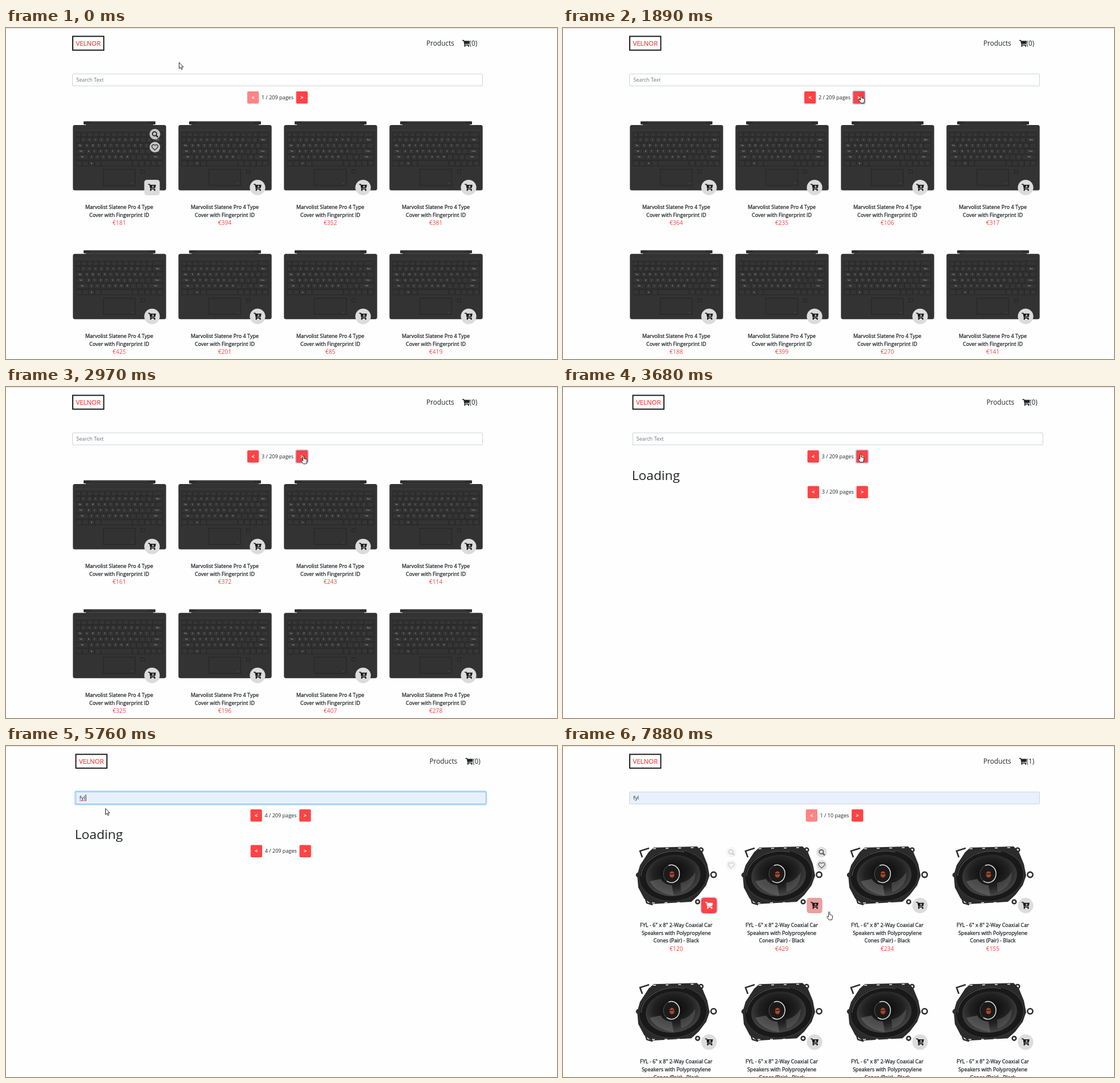
These frames come from a looping animation (966 by 580 pixels, 8000 ms). An HTML page:

```html
<!DOCTYPE html>
<html lang="en">
<head>
<meta charset="utf-8">
<title>Shop demo</title>
<style>
  html, body { margin: 0; width: 100%; height: 100%; overflow: hidden; background: #fefefe; }
  svg { display: block; width: 966px; height: 580px; font: 9.05px "Open Sans", sans-serif; fill: #212529; }
  text { white-space: pre; }
  .mid { text-anchor: middle; }
  .name { stroke: #212529; stroke-width: .28px; }
  .logo { font-size: 11.4px; fill: #ff4345; stroke: #ff4345; stroke-width: .25px; }
  .nav { font-size: 11.8px; }
  .price { font-size: 10.15px; fill: #ff4345; }
  .sign { fill: #fff; stroke: #fff; stroke-width: .35px; }
  .crisp { shape-rendering: crispEdges; }
  .key { font-size: 2.9px; fill: #bbb; text-anchor: middle; }
</style>
</head>
<body>
<svg viewBox="0 0 966 580">
  <defs>
    <radialGradient id="cone" cx=".5" cy=".42" r=".6">
      <stop offset=".15" stop-color="#0c0c0c"/>
      <stop offset=".6" stop-color="#222"/>
      <stop offset="1" stop-color="#4a4a4a"/>
    </radialGradient>
    <filter id="soft" x="-10%" y="-10%" width="120%" height="120%">
      <feDropShadow dx="0" dy="1" stdDeviation="1.6" flood-opacity=".3"/>
    </filter>
    <g id="keyboard"></g>
    <g id="speaker">
      <g fill="none" stroke="#2e2e2e" stroke-width="2.600">
        <circle cx="264" cy="225.500" r="4.600"/>
        <circle cx="242" cy="182" r="3.300"/>
        <circle cx="236" cy="273" r="3.300"/>
        <circle cx="132" cy="226" r="3"/>
        <path d="M139 195l-4-11 16-5M143 262l4 13 10 3"/>
      </g>
      <path d="M130 226l5-17 15-23 9-8 76-2 9 9 9 22 4 20-6 17-13 17-13 12-70 4-13-10-10-19z" fill="#2b2b2b"/>
      <path d="M158 180l74-2M156 275l66-1" stroke="#eee" stroke-width="1.500" stroke-dasharray="5 17"/>
      <g transform="rotate(-6 193 227)">
        <ellipse cx="193" cy="227" rx="59.500" ry="45" fill="#191919" stroke="#3c3c3c"/>
        <ellipse cx="193" cy="227" rx="48" ry="36" fill="url(#cone)"/>
        <path d="M137 222a57 43 0 0 1 80-34" fill="none" stroke="#4a4a4a" stroke-width="1.500"/>
      </g>
      <path d="M152 237q10 20 42 25l-3-18q-14-1-20-11z" fill="#777" opacity=".5"/>
      <path d="M206 240q16-3 26-19 0 26-25 35z" fill="#6a6a6a" opacity=".45"/>
      <ellipse cx="190" cy="224" rx="14" ry="15.500" fill="#1b1b1b" stroke="#555"/>
      <path d="M185 209.500a14 15.500 0 1 1-3 27" fill="none" stroke="#ddd" stroke-width="1.500"/>
      <ellipse cx="191" cy="225" rx="4.500" ry="5.500" fill="#a5472f"/>
      <path d="M179 225l24-2" stroke="#2a1713" stroke-width="1.300"/>
    </g>
    <g id="cart">
      <path d="M0 0h4.200l.5 2H18l-1.700 7.700H6.600l.3 1.300H16l-.4 2H5.200L2.900 2H0z"/>
      <circle cx="6" cy="14.300" r="1.750"/><circle cx="15" cy="14.300" r="1.750"/>
    </g>
    <path id="arrow" d="M.5.5v10.600l2.400-2.200 1.700 3.800 1.700-.8-1.600-3.600h3.200z" fill="#fff" stroke="#111" stroke-width=".9"/>
    <path id="hand" d="M3.500 9.300V1.800q0-1.300 1.100-1.300t1.100 1.300v3.800l3.700.9q1.300.3 1.300 1.800l-.5 3.200-.8 3.200H4.300L1 10.300Q.1 9 1.200 8.600q1.100-.2 2.300.9z" fill="#fff" stroke="#111" stroke-width=".9"/>
    <path id="beam" d="M-2.500-5.500h2l.5.5.5-.5h2M0-5V5M-2.500 5.500h2L0 5l.5.5h2" fill="none" stroke="#222"/>
  </defs>
  <path d="M0 .5h966" stroke="#dcdcdc"/>
  <g id="view"></g>
</svg>
<script>
const LOOP = 8000, RED = '#ff4345', QUERY = 'fyl';

// The screen refreshes only at these moments.
const ticks = [0, 120, 240, 390, 510, 630, 780, 1040, 1890, 2040, 2160, 2690, 2970, 3680,
  3830, 3950, 4080, 4200, 4350, 4500, 4650, 4800, 5090, 5210, 5330, 5480, 5760, 5910, 6030,
  6150, 6270, 6390, 6510, 6630, 6750, 6870, 6990, 7110, 7240, 7360, 7480, 7600, 7730, 7880];

const scenes = [
  [0, 'grid', 1], [1040, 'load', 1], [1890, 'grid', 2], [2690, 'load', 2], [2970, 'grid', 3],
  [3680, 'load', 3], [3830, 'grid', 4], [5760, 'load', 4], [6150, 'found', 1]
];

const pointer = [
  [0, 303, 60, 'arrow'], [240, 348, 76, 'arrow'], [390, 440, 91, 'beam'], [510, 545, 116, 'arrow'],
  [630, 529, 118, 'hand'], [780, 518, 117, 'hand'], [1890, 518, 117, 'hand'], [2040, 517, 121, 'hand'],
  [2160, 517, 120, 'hand'], [2970, 517, 120, 'hand'], [3680, 517, 117, 'hand'], [3830, 517, 117, 'arrow'],
  [4200, 260, 97, 'beam'], [4350, 254, 97, 'beam'], [4650, 254, 97, 'beam'], [4800, 253, 97, 'beam'],
  [5090, 232, 112, 'arrow'], [5330, 204, 115, 'arrow'], [5480, 174, 109, 'arrow'],
  [5910, 174, 109, 'arrow'], [6630, 256, 270, 'hand'], [6750, 254, 279, 'hand'], [7480, 252, 280, 'hand'],
  [7600, 300, 284, 'arrow'], [7730, 474, 291, 'hand'], [7880, 462, 290, 'hand']
];

// Hover progress of the first two cards: tool icons, squared button, red button.
const hover = [
  { tools: [[0, .9], [120, .5], [240, .15], [390, 0], [6270, 0], [6750, 1], [7600, 1], [7730, .8], [7880, .22]],
    square: [[0, 1], [240, .3], [390, 0], [6270, 0], [6630, 1]],
    red: [[6630, 0], [6990, 1]] },
  { tools: [[7600, 0], [7730, .1], [7880, .75]],
    square: [[7600, 0], [7730, .6], [7880, 1]],
    red: [[7600, 0], [7730, .5], [7880, .4]] }
];

const prices = {
  1: [181, 394, 352, 381, 425, 201, 85, 419],
  4: [378, 318, 360, 309, 348, 342, 363, 180],
  found: [120, 429, 234, 155]
};
const priceOf = (page, i) => (prices[page] || [])[i] || 90 + (page * 137 + i * 211) % 340;

const names = {
  grid: ['Marvolist Slatene Pro 4 Type', 'Cover with Fingerprint ID'],
  found: ['FYL - 6" x 8" 2-Way Coaxial Car', 'Speakers with Polypropylene', 'Cones (Pair) - Black']
};

const lerp = (a, b, p) => a + (b - a) * p;
const at = (rows, t) => rows.findLast(r => r[0] <= t) || rows[0];

function mix(rows, t, col = 1) {
  const a = at(rows, t), b = rows[rows.indexOf(a) + 1];
  if (!b || t <= a[0]) return a[col];
  return lerp(a[col], b[col], (t - a[0]) / (b[0] - a[0]));
}

const blend = p => `rgb(${[[220, 255], [220, 67], [220, 69]].map(([a, b]) => Math.round(lerp(a, b, p)))})`;
const rect = (x, y, w, h, fill, more = '') => `<rect x="${x}" y="${y}" width="${w}" height="${h}" fill="${fill}" ${more}/>`;
const text = (x, y, s, cls = '', more = '') => `<text x="${x}" y="${y}" class="${cls}" ${more}>${s}</text>`;
const use = (id, x, y, scale = 1, more = '') =>
  `<use href="#${id}" transform="translate(${x} ${y}) scale(${scale})" ${more}/>`;

function keyboard() {
  let out = rect(136, 163.6, 126, 5.4, '#2c2c2c', 'rx="1"') + rect(148, 165.2, 102, .9, '#484848') +
    rect(140, 168.6, 118, 1.6, '#3a3a3a') +
    rect(117.3, 170, 163.4, 114.4, '#333', 'rx="3.500"') + rect(117.3, 178, 163.4, .8, '#3f3f3f') +
    rect(122.5, 182.5, 153, 60, '#2d2d2d', 'rx="1"');
  const cap = (x, y, w, h, s) => rect(x, y, w - .9, h, '#343434', 'rx=".8" stroke="#242424" stroke-width=".5"') +
    text(x + w / 2 - .4, y + h / 2 + 1, s, 'key');
  const rows = [
    [183.5, 6.5, 9, '------------', ''], [192, 8.6, 8, '1234567890-=', 'Back'],
    [202, 8.6, 14, 'QWERTYUIOP[]', ''], [212, 8.6, 17, "ASDFGHJKL;'", 'Enter'],
    [222, 8.8, 22, 'ZXCVBNM,./', 'Shift']
  ];
  for (const [y, h, first, keys, last] of rows) {
    let x = 123 + first;
    out += cap(123, y, first, h, first > 10 ? 'Tab' : '-');
    for (const k of keys) { out += cap(x, y, 10.5, h, k); x += 10.5; }
    out += cap(x, y, 275.5 - x, h, last);
  }
  for (let i = 0; i < 4; i++) out += cap(123 + i * 11, 232.8, 11, 8.6, i === 2 ? '■' : '-');
  out += cap(167, 232.8, 55, 8.6, '');
  for (let i = 0; i < 5; i++) out += cap(222 + i * 10.7, 232.8, 10.7, 8.6, '▫-▫‹›'[i]);
  return out + rect(170.5, 247.5, 56, 28.5, '#323232', 'stroke="#1f1f1f" stroke-width=".7"') +
    rect(236.5, 248.5, 6, 6, 'none', 'stroke="#1c1c1c" stroke-width=".8" stroke-dasharray="4 1"') +
    text(222, 274, 'ID', 'key', 'opacity=".3"');
}

function header(count) {
  return rect(117, 14.6, 54.4, 24.2, 'none', 'stroke="#1c1c1f" stroke-width="2"') +
    text(144.2, 31, 'VELNOR', 'logo mid') + text(737, 31, 'Products', 'nav') +
    use('cart', 800, 21, .73) + text(812.6, 31, `(${count})`, 'nav');
}

function search(t) {
  const focus = t >= 4650 && t < 7480, filled = t >= 5210;
  let out = focus ? rect(115, 79, 722, 24, 'none', 'rx="3" stroke="#bfdeff" stroke-width="2"') : '';
  out += rect(116.5, 80.5, 719, 21, filled ? '#e8f0fe' : '#fff',
    `rx="2" class="crisp" stroke="${focus ? '#80bdff' : '#ced4da'}"`);
  out += filled ? text(123.2, 94, QUERY) : text(123.2, 94, 'Search Text', '', 'fill="#6c757d"');
  if (t >= 4500 && t < 7480) out += rect(t >= 5760 ? 134 : 123, 85, 1, 11.5, '#222');
  if (t >= 5760 && t < 7480) out += rect(123.5, 95.4, 10, .9, '#e33');
  return out;
}

function pager(page, total, ring) {
  const half = total > 99 ? 53 : 50.3;
  const button = (x, sign, off) => `<g opacity="${off ? .65 : 1}">` + rect(x, 111, 20.3, 21.5, RED, 'rx="2"') +
    text(x + 10.1, 124.8, sign, 'sign mid') + '</g>';
  const x = 476 + half - 20.3;
  return button(476 - half, '&lt;', page === 1) + text(476, 124.5, `${page} / ${total} pages`, 'mid') +
    (ring ? rect(x - .7, 110.3, 21.7, 22.9, 'none', 'rx="2.500" stroke="#a9cdfb" stroke-width="1.800"') : '') +
    button(x, '&gt;', false);
}

function tool(x, y, icon) {
  return `<g transform="translate(${x} ${y})" fill="none" stroke="#222"><circle r="9.300" fill="#d6d6d6" stroke="none"/>${icon}</g>`;
}

function card(kind, page, i, t) {
  const h = i < 2 ? hover[i] : null;
  const [tools, square, red] = h ? [mix(h.tools, t), mix(h.square, t), mix(h.red, t)] : [0, 0, 0];
  const added = i === 0 && t >= 7480;
  const x = 185 * (i % 4), y = (kind === 'found' ? 239.3 : 225.8) * (i > 3);
  const lines = names[kind], fill = blend(red), r = lerp(13.6, 5, square);
  let out = `<g transform="translate(${x} ${y})"><use href="#${kind === 'found' ? 'speaker' : 'keyboard'}"/>`;
  if (tools) {
    const tx = lerp(306, 256, tools);
    out += `<g opacity="${tools}">` +
      tool(tx, 186, '<circle cx="-.6" cy="-.6" r="3.600" stroke-width="1.800"/><path d="M2 2l3.400 3.400" stroke-width="2.400"/>') +
      tool(tx, 208.7, '<path d="M0 5.300L-4.700.6q-1.500-2.400.3-4.200 2.300-1.800 4.400.8 2.100-2.600 4.400-.8 1.800 1.800.3 4.200z" stroke-width="1.200"/>') + '</g>';
  }
  if (added) out += rect(240.8, 264.3, 30.4, 30.4, '#bfd9fb', 'rx="6.500"');
  out += rect(242.4, 265.9, 27.2, 27.2, fill, `rx="${r}"`);
  out += use('cart', 249.2, 273.2, .76, added ? 'fill="#fff"' : 'fill="#16161a"');
  if (!added) out += `<path d="M257.700 275.800v4M255.700 277.800h4" stroke="${fill}"/>`;
  lines.forEach((s, n) => out += text(198.5, 317.2 + n * 13.6, s, 'name mid'));
  const cost = priceOf(kind === 'found' ? kind : page, i);
  return out + text(198.5, 318 + lines.length * 13.6, '€' + cost, 'price mid') + '</g>';
}

function dropdown(t) {
  let out = rect(115.5, 102.5, 124.5, 104, '#fff', 'rx="2" filter="url(#soft)"');
  if (t >= 5210) out += rect(115.5, 107.5, 124.5, 23.5, '#ececec');
  [QUERY, 'ale', 'mili', 'f'].forEach((s, i) =>
    out += text(123.2, 122.5 + i * 23.5, s, '', 'font-size="8.500" stroke="#212529" stroke-width=".12"'));
  return out;
}

function render(t) {
  const [, kind, page] = at(scenes, t);
  const loading = kind === 'load', total = kind === 'found' ? 10 : 209;
  let out = `<g transform="translate(${loading ? 5.5 : 0})">` + header(t >= 7600 ? 1 : 0) + search(t) +
    pager(page, total, t >= 1040 && t < 4650);
  if (loading) {
    out += text(115.3, 163, 'Loading', '', 'style="font-size:22.7px"') +
      `<g transform="translate(.3 62.500)">${pager(page, total)}</g>`;
  } else {
    // Later cards go first so that sliding icons stay above their neighbours.
    for (let i = 7; i >= 0; i--) out += card(kind, page, i, t);
  }
  out += '</g>';
  if (t >= 4500 && t < 5760) out += dropdown(t);
  return out + use(at(pointer, t)[3], mix(pointer, t, 1), mix(pointer, t, 2));
}

document.getElementById('keyboard').innerHTML = keyboard();
const view = document.getElementById('view');
const start = performance.now();
let shown = -1;

function frame(now) {
  const t = Math.max(0, now - start) % LOOP;
  const tick = ticks.findLast(k => k <= t);
  if (tick !== shown) view.innerHTML = render(shown = tick);
  requestAnimationFrame(frame);
}
frame(start);
</script>
</body>
</html>
```
